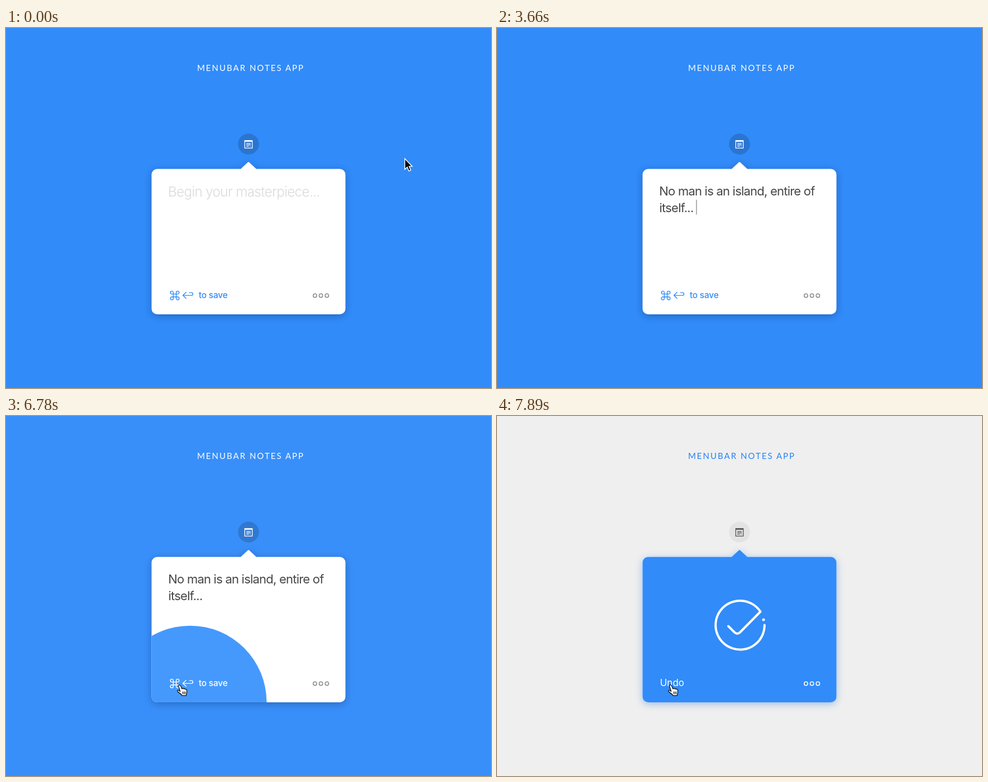
These frames come from a looping animation (868 by 645 pixels, 9 s). An HTML page:

```html
<!DOCTYPE html>
<html lang="en">
<head>
<meta charset="utf-8">
<title>Menubar notes app</title>
<style>
  html, body { margin: 0; width: 100%; height: 100%; overflow: hidden; background: #318bf9; }
  svg { display: block; width: 100vw; height: 100vh; }
  text { font-family: Inter, Roboto, sans-serif; font-optical-sizing: none; white-space: pre; }
  #title { font: 15px Lato, "Open Sans", sans-serif; letter-spacing: 2px; }
  #hint { font-size: 24.3px; font-weight: 300; letter-spacing: -.028em; fill: #dadada; }
  .note { fill: #464646; }
  .save { font-size: 15.5px; letter-spacing: -.25px; }
  .line { fill: none; stroke-linecap: round; stroke-linejoin: round; }
</style>
</head>
<body>
<svg viewBox="0 0 868 645" xmlns="http://www.w3.org/2000/svg">
  <defs>
    <path id="shape" d="M270.5 252.5H420L432.6 240.7Q434 239.4 435.4 240.7L448 252.5H597.5a10 10 0 0 1 10 10V503a10 10 0 0 1-10 10H270.5a10 10 0 0 1-10-10V262.5a10 10 0 0 1 10-10z"/>
    <clipPath id="cardClip"><use href="#shape"/></clipPath>
    <clipPath id="discClip"><circle class="disc" cy="512.5"/></clipPath>
    <filter id="blur" x="-20%" y="-20%" width="140%" height="140%"><feGaussianBlur stdDeviation="7"/></filter>
    <path id="loop" d="M-2.6-2.6h-2.6a2.6 2.6 0 1 1 2.6-2.6z"/>
    <g id="keys" class="line" stroke-width="1.4">
      <g transform="translate(302 479.2)">
        <rect x="-2.6" y="-2.6" width="5.2" height="5.2"/>
        <use href="#loop"/>
        <use href="#loop" transform="rotate(90)"/>
        <use href="#loop" transform="rotate(180)"/>
        <use href="#loop" transform="rotate(270)"/>
      </g>
      <path d="M322.3 473.6l-5.7 5.5 5.7 5.5M316.8 479.1h15.2a2.5 2.5 0 0 0 0-5h-3.8"/>
    </g>
    <g id="more" fill="none" stroke-width="1.5">
      <circle cx="552.9" cy="479.5" r="3.2"/>
      <circle cx="563.6" cy="479.5" r="3.2"/>
      <circle cx="574.3" cy="479.5" r="3.2"/>
    </g>
    <path id="beam" d="M-4.3-10C-1.5-10 0-9 0-7V7C0 9-1.5 10-4.3 10M4.3-10C1.5-10 0-9 0-7M0 7C0 9 1.5 10 4.3 10M-2.2 1.2H2.2"/>
  </defs>

  <rect id="back" width="868" height="645"/>
  <text id="title" x="438" y="77" text-anchor="middle">MENUBAR NOTES APP</text>
  <circle id="badge" cx="434" cy="208" r="18.7"/>
  <g id="icon" fill="none">
    <rect x="427.3" y="201.6" width="13.4" height="13.6" stroke-width="1.3"/>
    <path d="M427 202.5h14" stroke-width="2.6"/>
    <path d="M430 206.9h8M430 209.4h8M430 211.9h4.8M436.6 211.9h1.4" stroke-width="1.2"/>
  </g>

  <use id="shadow" href="#shape" y="3" filter="url(#blur)"/>
  <use href="#shape" fill="#fff"/>
  <text id="hint" x="290" y="301.5">Begin your masterpiece...</text>
  <text class="note" id="line1" x="290.3"></text>
  <text class="note" id="line2" x="290.5" y="329.5"></text>
  <rect id="caret" width="1.7" height="26.5" fill="#333"/>
  <use href="#keys" stroke="#318bf9"/>
  <text class="save" x="345" y="484.4" font-weight="500" fill="#318bf9">to save</text>
  <use href="#more" stroke="#8a8a8a"/>

  <g clip-path="url(#cardClip)">
    <circle class="disc" id="fill" cy="512.5"/>
    <g clip-path="url(#discClip)">
      <g id="saveWhite">
        <use href="#keys" stroke="#fff"/>
        <text class="save" x="345" y="484.4" font-weight="500" fill="#fff">to save</text>
      </g>
      <text id="undo" x="291.7" y="484" font-size="17" fill="#fff">Undo</text>
      <use href="#more" stroke="#fff"/>
      <path id="check" class="line" pathLength="1" stroke="#fff" stroke-width="4" d="M414 376.5L425.5 388Q430 391.8 434.5 388L471.5 350.5A43.8 43.8 0 1 0 478.8 374.6"/>
      <circle id="dot" cx="477" cy="365" fill="#fff"/>
      <path id="burst" class="line" stroke="#fff" stroke-width="1.6"/>
    </g>
  </g>

  <g id="pointer">
    <path id="arrow" d="M0 0V19.2L4.4 15.2 7.5 22.4 10.8 21 7.7 13.9H13.2z" fill="#000" stroke="#fff" stroke-width="1.4"/>
    <g id="ibeam" class="line">
      <use href="#beam" stroke="#fff" stroke-width="3.2"/>
      <use href="#beam" stroke="#000" stroke-width="1.7"/>
    </g>
    <g id="hand" class="line" stroke="#111" stroke-width="1.3">
      <path fill="#fff" d="M1.2 11.4L-1.7 2.2C-2.3-.2 1-1 1.8 1L4.5 6.9C5.3 5.4 7.3 5.7 7.8 7.2 8.8 6.1 10.4 6.6 10.8 7.9 12 7.2 13 8 13.1 9.2L13 13.2C12.9 15.3 12 16.3 12 18.8H4.4C3.6 16.4-.6 14.4-3.4 11.5-4.6 10.1-2.8 8.7-1.2 9.7z"/>
      <path d="M5.6 12v4M8 12v4M10.3 12v4" stroke-width="1.1"/>
    </g>
  </g>
</svg>
<script>
  const LOOP = 9000, TICK = 30;
  const TEXT = "No man is an island, entire of itself...";
  const BREAK = 30;
  const BLUE = [49, 139, 249], PRESSED = [69, 153, 253], WHITE = [255, 255, 255], GREY = [239, 239, 239];
  const $ = id => document.getElementById(id);
  const discs = document.querySelectorAll(".disc");

  const linear = p => p;
  const quad = p => p < .5 ? 2 * p * p : 1 - 2 * (1 - p) ** 2;
  const cubic = p => p < .5 ? 4 * p ** 3 : 1 - 4 * (1 - p) ** 3;
  const ramp = (t, a, b, ease = linear) => ease(Math.min(1, Math.max(0, (t - a) / (b - a))));
  const lerp = (a, b, p) => a + (b - a) * p;
  const mix = (a, b, p) => `rgb(${a.map((v, i) => Math.round(lerp(v, b[i], p)))})`;
  const set = (id, attrs) => {
    for (const name in attrs) $(id).setAttribute(name, attrs[name]);
  };
  const show = (id, on) => set(id, { visibility: on ? "visible" : "hidden" });

  // Pointer and disc share their stops: [start, end, x, y, disc x, disc radius]
  const STOPS = [
    [3990, 4620, 374, 423, 195, 95],
    [4860, 5280, 368, 465, 233.5, 101.5],
    [5700, 6090, 310.5, 482, 329.5, 110]
  ];

  function follow(t) {
    let pose = [370, 330, 150, 90];
    for (const [a, b, ...to] of STOPS) {
      const p = ramp(t, a, b, quad);
      pose = pose.map((v, i) => lerp(v, to[i], p));
    }
    return pose;
  }

  function drawScene(t) {
    const bg = ramp(t, 6738, 6932, cubic), slow = ramp(t, 6738, 7043, cubic);
    set("back", { fill: mix(BLUE, GREY, bg) });
    set("title", { fill: mix(WHITE, [37, 131, 247], slow) });
    set("badge", { fill: "#000", "fill-opacity": lerp(.16, .05, slow) });
    set("icon", { stroke: mix(WHITE, [85, 85, 85], slow) });
    set("shadow", { fill: mix([0, 20, 60], [40, 110, 200], slow), opacity: lerp(.3, .4, slow) });
  }

  function drawNote(t) {
    const typed = TEXT.slice(0, Math.max(0, Math.floor((t - 928.6) / 51.6) + 1));
    const shrink = ramp(t, 2040, 2130);
    show("hint", t < 480);
    $("line1").textContent = typed.slice(0, BREAK);
    $("line2").textContent = typed.slice(BREAK + 1);
    set("line1", {
      y: lerp(301, 299.5, shrink),
      "font-size": lerp(24.3, 22, shrink),
      "letter-spacing": lerp(-.72, -.78, shrink)
    });
    set("line2", { "font-size": 22, "letter-spacing": -.78 });

    const fades = [450, 720, 3000, 3270, 3620, 3900];
    const alpha = fades.reduce((sum, at, i) => sum + (i % 2 ? -1 : 1) * ramp(t, at, at + 90), 0);
    const ended = t > 2000;
    set("caret", { x: ended ? 356.2 : 292.3, y: ended ? 307.8 : 280.2, opacity: alpha });
  }

  function drawSaved(t, cx, hoverRadius) {
    const r = hoverRadius + 320 * ramp(t, 6684, 7032, cubic);
    for (const disc of discs) {
      disc.setAttribute("cx", cx);
      disc.setAttribute("r", r);
    }
    set("fill", { fill: mix(BLUE, PRESSED, ramp(t, 6610, 6740) - ramp(t, 6800, 7530)) });

    const swap = ramp(t, 6800, 7000);
    set("saveWhite", { opacity: 1 - swap });
    set("undo", { opacity: swap });

    const drawn = ramp(t, 6645, 7530, quad);
    show("check", drawn > 0);
    set("check", { "stroke-dasharray": `${drawn} 2` });
    set("dot", { r: 2.5 * ramp(t, 7530, 7620) });

    const p = ramp(t, 7530, 7890);
    const near = 25 * p ** 1.5, far = 25 * (1 - (1 - p) ** 2);
    let rays = "";
    for (let k = 0; k < 8; k++) {
      if (k === 2) continue;
      const a = k * Math.PI / 4, c = Math.cos(a), s = Math.sin(a);
      rays += `M${477 + near * c} ${365 + near * s}L${477 + far * c} ${365 + far * s}`;
    }
    set("burst", { d: rays });
    show("burst", p > 0 && p < 1);
  }

  function drawPointer(t, x, y) {
    const intro = t < 480;
    if (intro) {
      const p = ramp(t, 0, 450, quad);
      x = lerp(713.7, 374, p);
      y = lerp(234, 300, p);
    }
    const visible = intro || t >= 3990;
    const kind = intro && x > 600 ? "arrow" : !intro && x < 335 ? "hand" : "ibeam";
    for (const id of ["arrow", "ibeam", "hand"]) show(id, visible && id === kind);
    set("pointer", { transform: `translate(${x} ${y})` });
  }

  function draw(t) {
    const [x, y, cx, r] = follow(t);
    drawScene(t);
    drawNote(t);
    drawSaved(t, cx, r);
    drawPointer(t, x, y);
  }

  const start = performance.now();
  function frame() {
    const t = (performance.now() - start) % LOOP;
    draw(Math.floor(t / TICK) * TICK);
    requestAnimationFrame(frame);
  }
  frame();
</script>
</body>
</html>
```
